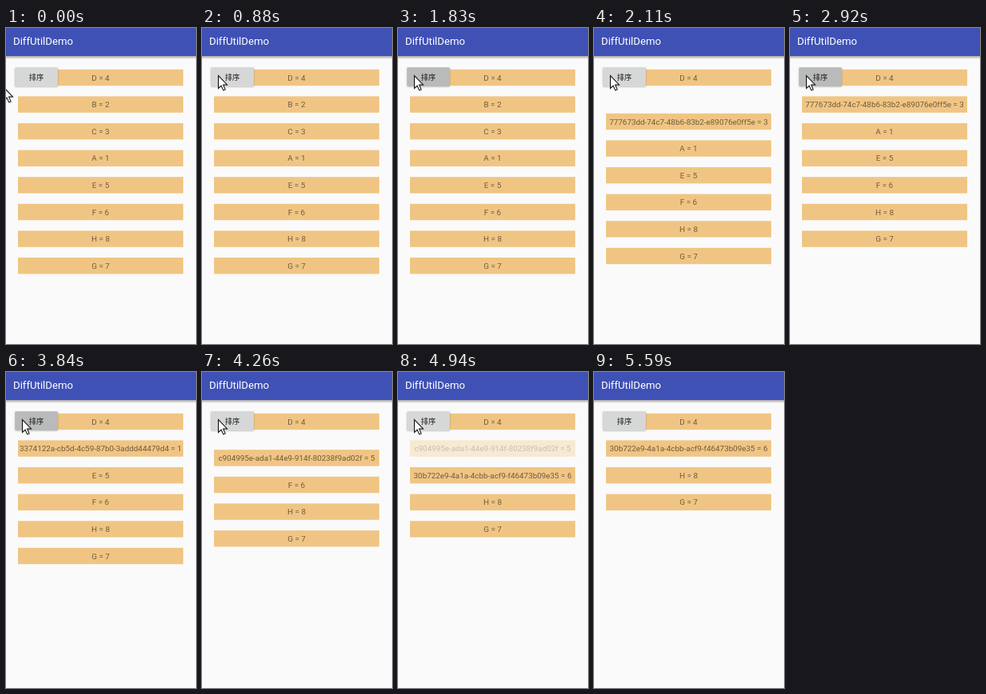
An HTML page with a canvas that plays this animation: 238 by 395 pixels, repeating every 6.18 s.

```html
<!DOCTYPE html>
<html lang="zh">
<head>
<meta charset="utf-8">
<title>DiffUtilDemo</title>
<style>
  html, body { margin: 0; width: 100%; height: 100%; overflow: hidden; background: #fafafa; }
  canvas { display: block; }
</style>
</head>
<body>
<canvas id="stage"></canvas>
<script>
const W = 238, H = 395, LOOP = 6180;
const ROW = { x: 15, y: 51.8, w: 207, h: 20.4, pitch: 33.6 };
const FADE = 120, MOVE = 250;

const items = ['D = 4', 'B = 2', 'C = 3', 'A = 1', 'E = 5', 'F = 6', 'H = 8', 'G = 7'];

// Each tap removes the second row and renames the one that follows it.
const taps = [
  { press: 1750, release: 1850, start: 1888, name: '777673dd-74c7-48b6-83b2-e89076e0ff5e = 3' },
  { press: 2920, release: 3000, start: 3040, name: '3374122a-cb5d-4c59-87b0-3addd44479d4 = 1' },
  { press: 3840, release: 3950, start: 3992, name: 'c904995e-ada1-44e9-914f-80238f9ad02f = 5' },
  { press: 4730, release: 4830, start: 4868, name: '30b722e9-4a1a-4cbb-acf9-f46473b09e35 = 6' }
];

// Pointer tip: time, x, y
const path = [
  [50, -3, 74], [600, 14, 56.5], [670, 14, 56.5], [880, 20, 59],
  [5140, 20, 59], [5335, 110, 295], [5590, 167, 396]
];

const canvas = document.getElementById('stage');
const ctx = canvas.getContext('2d');
const dpr = window.devicePixelRatio || 1;
canvas.width = W * dpr;
canvas.height = H * dpr;
canvas.style.width = W + 'px';
canvas.style.height = H + 'px';

const clamp = v => Math.min(1, Math.max(0, v));
const progress = (t, from, length) => clamp((t - from) / length);
const smooth = p => (1 - Math.cos(Math.PI * p)) / 2;
const easeOut = p => 1 - (1 - p) * (1 - p);

function text(str, x, y, font, color, align = 'center') {
  ctx.font = font;
  ctx.fillStyle = color;
  ctx.textAlign = align;
  ctx.fillText(str, x, y);
}

function drawBar() {
  const shade = ctx.createLinearGradient(0, 35, 0, 39);
  shade.addColorStop(0, 'rgba(0,0,0,.34)');
  shade.addColorStop(1, 'rgba(0,0,0,0)');
  ctx.fillStyle = shade;
  ctx.fillRect(0, 35, W, 4);
  ctx.fillStyle = '#3f51b5';
  ctx.fillRect(0, 0, W, 35);
  text('DiffUtilDemo', 9, 21, '13.2px Roboto, sans-serif', '#fff', 'left');
}

function drawRows(t) {
  const shift = taps.reduce((sum, tap) => sum + smooth(progress(t, tap.start + FADE, MOVE)), 0);
  items.forEach((label, i) => {
    const removal = taps[i - 1], rename = taps[i - 2];
    const alpha = removal ? 1 - smooth(progress(t, removal.start, FADE)) : 1;
    if (alpha <= 0) return;
    const y = ROW.y + ROW.pitch * (i ? i - shift : 0);
    ctx.globalAlpha = alpha;
    ctx.fillStyle = '#f0c584';
    ctx.fillRect(ROW.x, y, ROW.w, ROW.h);
    const str = rename && t >= rename.start ? rename.name : label;
    text(str, ROW.x + ROW.w / 2, y + 13.8, '9.87px Roboto, sans-serif', 'rgba(0,0,0,.54)');
  });
  ctx.globalAlpha = 1;
}

function drawButton(t) {
  const pressed = Math.max(...taps.map(tap =>
    t < tap.press ? 0 : 1 - progress(t, tap.release, 60)));
  const grey = Math.round(214 - 29 * pressed);
  ctx.save();
  ctx.shadowColor = 'rgba(0,0,0,.3)';
  ctx.shadowBlur = 2 * dpr;
  ctx.shadowOffsetY = 0.7 * dpr;
  ctx.fillStyle = `rgb(${grey},${grey + 1},${grey + 1})`;
  ctx.beginPath();
  ctx.roundRect(11.3, 49.3, 53.6, 23.6, 1.4);
  ctx.fill();
  ctx.restore();
  text('排序', 38, 65.3, '500 9.3px "Noto Sans CJK SC", "Noto Sans CJK", sans-serif', 'rgba(0,0,0,.87)');
}

function pointerAt(t) {
  if (t <= path[0][0]) return path[0].slice(1);
  for (let i = 1; i < path.length; i++) {
    const [t0, x0, y0] = path[i - 1], [t1, x1, y1] = path[i];
    if (t > t1) continue;
    const raw = progress(t, t0, t1 - t0);
    const p = i === path.length - 1 ? easeOut(raw) : i === path.length - 2 ? raw * raw : smooth(raw);
    return [x0 + (x1 - x0) * p, y0 + (y1 - y0) * p];
  }
  return null;
}

function drawPointer(t) {
  const tip = pointerAt(t);
  if (!tip) return;
  ctx.save();
  ctx.translate(tip[0] + 0.5, tip[1] + 0.5);
  ctx.beginPath();
  [[0, 0], [0, 16], [3.6, 12.6], [6.2, 18.4], [8.6, 17.4], [6.1, 11.6], [11, 11.4]]
    .forEach(([x, y]) => ctx.lineTo(x, y));
  ctx.closePath();
  ctx.fillStyle = '#fff';
  ctx.fill();
  ctx.strokeStyle = '#111';
  ctx.lineWidth = 1.1;
  ctx.stroke();
  ctx.restore();
}

function draw(t) {
  ctx.setTransform(dpr, 0, 0, dpr, 0, 0);
  ctx.fillStyle = '#fafafa';
  ctx.fillRect(0, 0, W, H);
  drawBar();
  drawRows(t);
  drawButton(t);
  drawPointer(t);
}

const begin = performance.now();
function frame() {
  draw((performance.now() - begin) % LOOP);
  requestAnimationFrame(frame);
}
frame();
</script>
</body>
</html>
```
